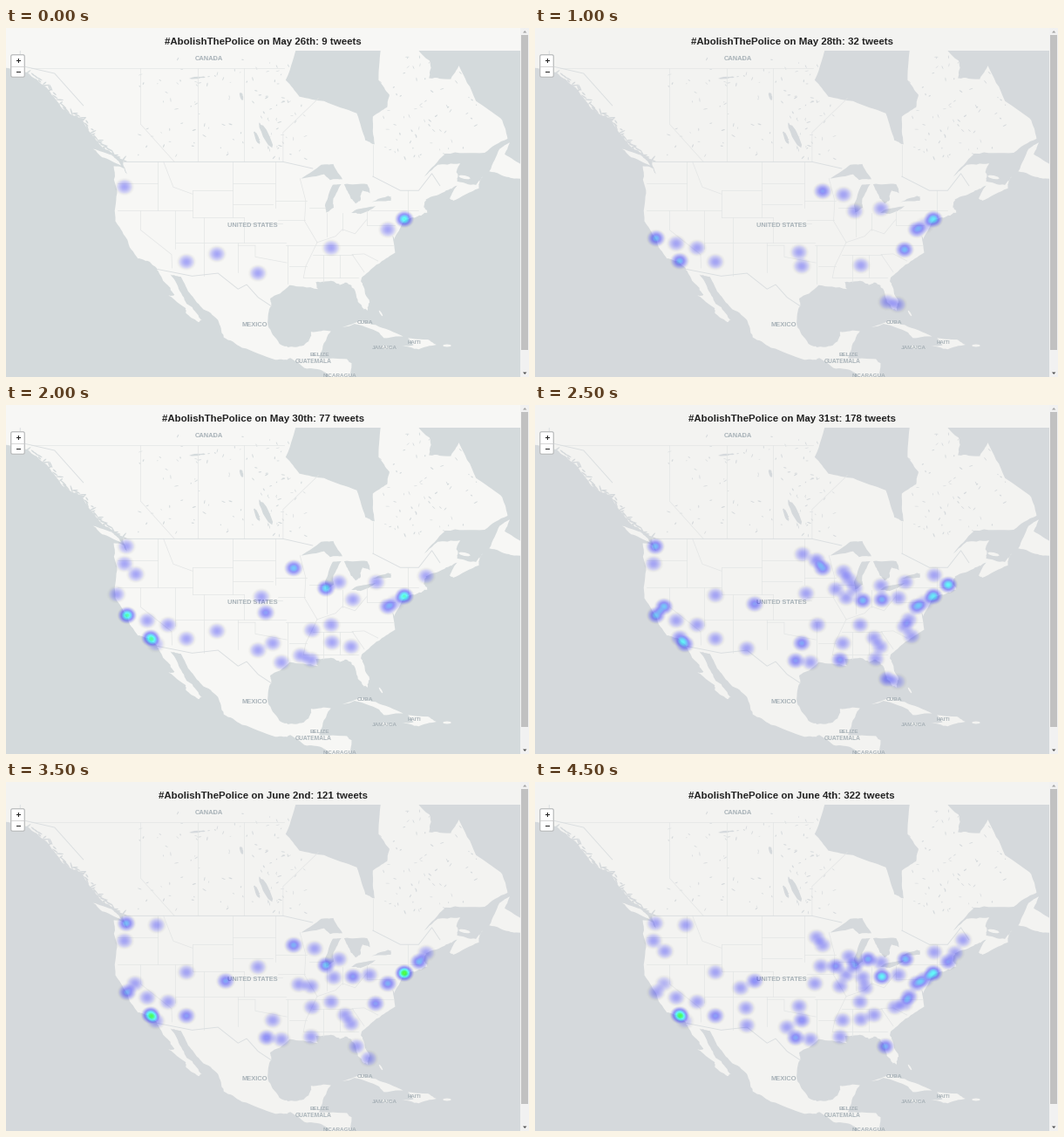
These frames come from a looping animation (600x400 px, 5 s). A matplotlib script:

```python
import numpy as np
import matplotlib.pyplot as plt
from matplotlib.animation import FuncAnimation
from matplotlib.patches import Polygon, Rectangle, FancyBboxPatch

W, H, TOP, RIGHT, DPI = 600, 400, 26, 590, 100
PX = 72 / DPI
rng = np.random.default_rng(7)

# Key points of the coast (longitude, latitude); rough() adds the detail
PACIFIC = [
    (-145, 60.3), (-139.8, 59.6), (-136.4, 58), (-133.6, 55.6),
    (-130.3, 54.4), (-128.3, 52.2), (-126.5, 50.8), (-123.1, 49.2),
    (-122.4, 47.3), (-122.8, 48.1), (-124.7, 48.4), (-124.1, 44.6),
    (-124.4, 40.4), (-122.5, 37.7), (-120.6, 34.5), (-118.4, 33.75),
    (-117.2, 32.7), (-115.8, 30.2), (-114.1, 28), (-115.1, 27.8),
    (-112.1, 25.5), (-112.1, 24.6), (-109.9, 22.9), (-109.4, 23.3),
    (-111.3, 25.9), (-113.2, 28.7), (-114.8, 31.6), (-113, 31.2),
    (-111.2, 27.95), (-109.4, 25.7), (-106.5, 23.3), (-105.5, 20),
    (-102.3, 18), (-96.5, 15.65), (-93.9, 16), (-91, 13.9), (-87.7, 13.1),
    (-86, 11.5)]
GULF = [
    (-83.5, 11), (-83.2, 15), (-84, 15.8), (-88.9, 16), (-88.2, 18.4),
    (-86.8, 21.2), (-90.3, 21.1), (-90.5, 19.8), (-91.5, 18.5),
    (-94.3, 18.1), (-95.8, 18.8), (-97.8, 22.4), (-97.2, 25.9),
    (-97.4, 27.3), (-94, 29.7), (-89.1, 29), (-89.5, 30.2), (-86.5, 30.4),
    (-85.3, 29.7), (-84, 30.1), (-82.8, 29.1), (-82.1, 26.7), (-81, 25.2)]
ATLANTIC = [
    (-80.4, 25.2), (-80.05, 26.5), (-81.3, 29.8), (-81.3, 31.2),
    (-77.9, 33.9), (-75.6, 35.3), (-76.3, 39), (-75.9, 37.2), (-74, 40.4),
    (-72, 41), (-70, 41.7), (-70.6, 42.5), (-70.2, 43.7), (-67, 44.8),
    (-64.8, 45.7), (-66.1, 43.8), (-65.5, 43.5), (-61, 45.3), (-60.4, 47),
    (-61.5, 45.8), (-64.8, 46.3), (-64.9, 47.7), (-64.3, 48.8),
    (-68.2, 48.6), (-70.5, 47), (-66.8, 50.1), (-60, 50.2), (-56, 52),
    (-57.2, 54.5), (-61.5, 56.5), (-64.5, 60.3), (-65.9, 58.9),
    (-69.7, 59), (-69.6, 60.8), (-74, 63)]
ISLANDS = [
    [(-128.3, 50.7), (-125, 49.9), (-123.4, 48.5), (-126.7, 49.6)],
    [(-59.2, 47.7), (-57.4, 50.7), (-55.6, 51.5), (-56.5, 50),
     (-53.2, 48.5), (-53, 46.7), (-55.8, 46.9)],
    [(-84.9, 21.9), (-82, 23.1), (-79, 22.4), (-74.2, 20.2), (-77.6, 19.9),
     (-78.5, 21), (-82.7, 22.6)],
    [(-74.4, 18.4), (-72.4, 18.5), (-73.4, 19.9), (-69.9, 19.6),
     (-68.4, 18.6), (-71.5, 17.7)]]
LAKES = [
    [(-78, 62.6), (-78.5, 58.8), (-76.6, 57.2), (-77, 55.8), (-79.5, 54.7),
     (-79.2, 51.3), (-80.8, 51.8), (-82.3, 55.1), (-88, 56.5), (-92.3, 57),
     (-94.7, 58.8), (-92.5, 62.6)],
    [(-92, 46.7), (-88.5, 48.6), (-86.4, 48.7), (-84.8, 46.6), (-87, 46.5),
     (-88, 47.3)],
    [(-87.6, 41.7), (-87.8, 43), (-86.5, 45.8), (-85, 45.9), (-86.4, 43.8),
     (-86.3, 42.5)],
    [(-84.5, 45.9), (-83.4, 44), (-82.5, 43.1), (-81.7, 43.5), (-81.3, 45),
     (-80, 44.6), (-80.5, 45.9)],
    [(-83.3, 41.7), (-81.7, 41.5), (-79, 42.7), (-82.3, 42.2)],
    [(-79.7, 43.3), (-77.5, 44), (-76.3, 44.1), (-76.4, 43.5)]]

# Borders: straight ones as (fixed, from, to), the others as key points
PARALLELS = [
    (60, -139, -95), (46, -124, -117), (46, -104, -96.5), (45, -111, -104),
    (43, -104, -97), (42, -124, -111), (41, -111, -102), (40, -102, -95.3),
    (37, -114, -94.6), (36.5, -94.6, -76), (35, -90, -83), (33, -94, -91),
    (31, -91.6, -82), (43.5, -96.5, -91), (40.6, -96, -91.4),
    (42.5, -90.6, -87.8), (42, -80, -71.5), (39.7, -80.5, -75.7)]
MERIDIANS = [
    (-110, 49, 60), (-102, 49, 60), (-117, 42, 49), (-111, 41, 45),
    (-104, 41, 49), (-114, 36, 42), (-109, 31.3, 41), (-102, 37, 41),
    (-103, 32, 37), (-94.3, 30, 36.5), (-88.2, 30.3, 35), (-85.2, 31, 35),
    (-84.8, 39, 41.7), (-87.5, 38, 41.7), (-80.5, 39.7, 42),
    (-79.5, 47, 51.2), (-73.4, 41, 45), (-96.5, 42.5, 49)]
WINDING = [
    [(-120, 60), (-120, 53.8), (-114.1, 49)],
    [(-89, 56.8), (-95.15, 52.8), (-95.15, 49)],
    [(-120, 42), (-120, 39), (-114.6, 35), (-114.5, 32.7)],
    [(-116, 49), (-114.3, 45.5), (-111, 44.5)],
    [(-92.2, 46.7), (-91.2, 43.5), (-91.4, 40.4), (-89.2, 37), (-91.2, 33),
     (-91.6, 31)],
    [(-89.2, 37), (-86, 38), (-84.8, 39.1), (-82.6, 38.4), (-80.6, 40.6)],
    [(-103, 36.5), (-100, 36.5), (-100, 34.6), (-94.5, 33.6)],
    [(-83.1, 35), (-81, 35.1), (-78.6, 33.9)], [(-83.1, 35), (-81, 32)]]
NATIONAL = [
    [(-123, 49), (-95.15, 49), (-90, 48.1)],
    [(-117.1, 32.5), (-111, 31.3), (-106.5, 31.8), (-103, 29),
     (-101.5, 29.8), (-99.5, 27.5), (-97.2, 25.9)],
    [(-79.5, 47), (-74.7, 45), (-71.5, 45), (-69.2, 47.4), (-67.8, 45.7)],
    [(-141, 62), (-141, 60.3), (-135, 59.5), (-130, 56)]]

LABELS = [
    ("CANADA", 233, 34.5, 7.5), ("UNITED STATES", 283, 226, 7.4),
    ("MEXICO", 285.5, 340, 7.5), ("CUBA", 412, 337, 6.5),
    ("JAMAICA", 434.5, 366, 6.4), ("HAITI", 468, 360, 6.2),
    ("BELIZE", 359.5, 373.5, 6.4), ("GUATEMALA", 352.5, 381, 6.6),
    ("NICARAGUA", 382.5, 398.5, 6.4)]

# Places on the stage, in pixels
PLACES = dict(
    sea=(138, 162), por=(136, 182), ore=(149, 194), eur=(127, 217),
    spo=(173, 164), boi=(186, 197), slc=(207, 218), sac=(148, 231),
    sf=(139, 241), cal=(162, 247), lv=(186, 252), la=(166, 267),
    sd=(172, 274), az=(207, 268), abq=(242, 259), elp=(243, 279),
    cos=(236, 236), den=(252, 228), ros=(270, 269), far=(307, 171),
    stc=(323, 178), msp=(330, 187), wis=(354, 191), gre=(360, 200),
    chi=(367, 210), mic=(382, 203), det=(397, 207), ind=(376, 224),
    ohi=(398, 223), lou=(379, 236), stl=(357, 221), iow=(345, 211),
    dav=(328, 211), oma=(311, 216), neb=(289, 212), kan=(293, 220),
    wic=(298, 238), kc=(321, 231), jef=(336, 232), col=(350, 234),
    tul=(324, 252), okc=(303, 257), dal=(306, 273), tex=(289, 281),
    aus=(299, 293), hou=(316, 295), br=(338, 287), no=(350, 292),
    lr=(351, 258), mem=(353, 273), nas=(373, 252), bir=(374, 272),
    atl=(396, 277), knx=(389, 267), sav=(391, 291), tam=(402, 303),
    fm=(404, 314), mia=(416, 317), wil=(432, 265), cha=(413, 258),
    ral=(424, 254), nor=(429, 246), dc=(438, 231), pit=(417, 221),
    phi=(447, 226), ny=(457, 219), buf=(425, 203), alb=(458, 195),
    bos=(474, 206), me=(482, 196), ban=(491, 181))

# (title, bright tiles, places with weights)
DAYS = [
    ("May 26th: 9", True, "por az abq tex nas dc ny*2.3"),
    ("May 27th: 14", False,
     "por sf la*1.5 lv den msp chi dal atl mia dc ny*2 bos"),
    ("May 28th: 32", False,
     "sf*1.7 cal lv la*1.7 az okc dal msp*1.4 wis chi det bir fm mia "
     "ral*1.7 dc*1.5 phi*.7 ny*2.1"),
    ("May 29th: 45", False,
     "sea por ore sf*2 cal lv la*2 sd az abq msp*2 wis chi*1.5 ohi okc "
     "dal aus hou no nas atl mia ral dc*1.5 phi ny*2 bos"),
    ("May 30th: 77", True,
     "sea por ore eur sf*2.5 cal lv la*2.4 sd*.8 az abq kan wic*1.4 tex "
     "dal hou br no msp*1.8 chi*2 mic ohi buf nas lr bir atl dc*1.5 "
     "phi*.7 ny*2.4 me"),
    ("May 31st: 178", False,
     "sea*1.7 por sac*1.8 sf*1.8 cal lv la*1.3 sd*1.7 slc den*1.4 az elp "
     "far stc*1.2 msp*1.6 wis iow gre chi stl ind*1.7 oma tul dal*1.5 "
     "aus*1.4 hou no*1.4 mem det ohi*1.6 pit buf alb bos*2.2 ny*2.1 "
     "phi*.8 dc*1.7 nor ral wil nas knx atl sav fm*1.3 mia*.8"),
    ("June 1st: 133", True,
     "sea*1.9 por ore boi*1.3 eur sac sf*1.8 cal*1.3 la*3 az den neb stc "
     "msp wis dav iow gre*.7 chi*1.7 mic stl kc jef col lou*1.8 ohi nas "
     "lr okc dal tex aus*1.4 br knx atl tam*1.5 mia ral*1.6 dc*1.5 nor*.7 "
     "ny*3 bos*2.5"),
    ("June 2nd: 121", False,
     "sea*1.7 por spo sf*1.6 sac cal lv la*2.6 sd az*1.4 slc den*1.5 neb "
     "msp*1.6 wis chi*1.8 mic ind jef col ohi*1.4 pit nas lr dal aus*1.3 "
     "hou no atl knx tam mia ral*1.4 dc*1.6 ny*3 bos*1.7 me"),
    ("June 3rd: 113", False,
     "sea*1.5 por*1.5 spo sf*1.3 sac cal lv la*2.3 sd*.8 az*2 ros cos "
     "den*1.9 neb oma msp*1.5 wis gre*.7 chi*1.9 ind jef col mic ohi pit "
     "ny*3.7 dc*1.5 nor bos*1.5 me cha ral knx mem dal aus*1.5 tam"),
    ("June 4th: 322", False,
     "sea por ore spo sf sac*.8 cal lv la*2.7 sd*.7 slc az*1.4 abq elp "
     "cos den*1.3 stc msp dav iow*1.4 gre chi*1.5 mic*1.6 det stl ind "
     "col kc lou ohi*2.2 pit buf*1.7 alb me ban bos*1.4 ny*2.2 phi*1.3 "
     "dc*1.5 nor*1.4 ral cha nas bir knx mem okc dal*1.3 tex aus*1.5 "
     "hou no tam*1.6")]


def project(points):
    lon, lat = np.array(points, float).T
    merc = np.degrees(np.log(np.tan(np.pi / 4 + np.radians(lat) / 2)))
    return np.column_stack([457 + (lon + 74) * 6.578,
                            219 - (merc - 44.65) * 5.6])


def rough(pts, amp=0.9, steps=3):
    """Subdivide a closed outline, nudging every new point."""
    for _ in range(steps):
        mid = (pts + np.roll(pts, -1, axis=0)) / 2
        mid += rng.normal(0, amp, mid.shape)
        pts = np.stack([pts, mid], axis=1).reshape(-1, 2)
        amp /= 1.7
    return pts


def oval(x, y, a, b, tilt):
    t = np.linspace(0, 2 * np.pi, 9)[:-1]
    z = (a * np.cos(t) + 1j * b * np.sin(t)) * np.exp(1j * tilt)
    return np.column_stack([x + z.real, y + z.imag])


fig = plt.figure(figsize=(W / DPI, H / DPI), dpi=DPI)
ax = fig.add_axes([0, 0, 1, 1])
ax.axis("off")
land, water = [], []


def shape(group, pts, z):
    group.append(ax.add_patch(Polygon(pts, lw=0, zorder=z)))


def box(x, y, w, h, color, z):
    return ax.add_patch(Rectangle((x, y), w, h, fc=color, lw=0, zorder=z))


def stroke(xs, ys, color, width, z):
    ax.plot(xs, ys, color=color, lw=width * PX, zorder=z)


def text(x, y, s, px, color, z, **kw):
    return ax.text(x, y, s, fontsize=px * PX, color=color, zorder=z,
                   family="Liberation Sans", weight="bold", ha="center", **kw)


water.append(box(0, 0, W, H, "w", 0))
shape(land, rough(project(PACIFIC + GULF + ATLANTIC + [(-145, 63)])), 1)
for isle in ISLANDS:
    shape(land, rough(project(isle), 0.5), 1)
for small in [(74, 90, 8, 3, 1.2), (435, 366, 6, 1.8, 0.1),
              (506, 364, 5, 1.5, 0), (430, 327, 4, 1, 1), (526, 171, 7, 2, 0.2)]:
    shape(land, oval(*small), 1)
for lake in LAKES:
    shape(water, rough(project(lake), 0.5), 2)
for small in [(298, 123, 16, 3.5, 1.1), (288, 126, 8, 2, 1.2),
              (220, 57, 10, 1.2, -0.1), (270, 78, 5, 1.6, 1.3)]:
    shape(water, rough(oval(*small), 0.5, 1), 2)

# Scattered northern lakes
for x0, x1, count in [(150, 325, 85), (300, 345, 35), (425, 540, 75)]:
    for x, y in rng.uniform((x0, 32), (x1, 150), (count, 2)):
        shape(water, oval(x, y, rng.uniform(0.8, 2.6), rng.uniform(0.3, 0.7),
                          rng.uniform(0, np.pi)), 2)
# Inlets along the north-west coast
for (x0, y0), (x1, y1) in zip(*[project(PACIFIC[i:i + 6]) for i in (1, 2)]):
    for t in np.linspace(0, 1, 8):
        x, y = x0 + t * (x1 - x0), y0 + t * (y1 - y0)
        shape(water, oval(x + rng.uniform(0, 5), y, rng.uniform(2, 5), 0.8,
                          rng.uniform(-0.9, 1.3)), 2)

lines = [[(a, lat), (b, lat)] for lat, a, b in PARALLELS]
lines += [[(lon, a), (lon, b)] for lon, a, b in MERIDIANS]
for line in lines + WINDING:
    stroke(*project(line).T, "#e3e5e5", 0.7, 3)
for line in NATIONAL:
    stroke(*project(line).T, "#dadee0", 0.9, 3)

for name, x, y, px in LABELS:
    text(x, y, name, px, "#a8b2b8", 4, va="center_baseline")

heat = ax.imshow(np.zeros((H - TOP, RIGHT, 4)), extent=(0, RIGHT, H, TOP),
                 interpolation="nearest", aspect="auto", zorder=5)

land.append(box(0, 0, RIGHT, TOP, "w", 6))
title = text(294.7, 19, "", 11.5, "#222222", 7, va="baseline")

# Zoom buttons
ax.add_patch(FancyBboxPatch((6.5, 31.5), 14, 24, fc="white", ec="#bdbfc0",
                            lw=1.3 * PX, zorder=7,
                            boxstyle="round,pad=0.8,rounding_size=2"))
stroke([6, 21], [43.5, 43.5], "#cccccc", 0.8, 8)
stroke([13.5, 13.5], [35.2, 39.2], "#222222", 1, 8)
for y in (37.2, 50):
    stroke([11.5, 15.5], [y, y], "#222222", 1, 8)

# Scrollbar
box(RIGHT, 0, W - RIGHT, H, "#f1f1f1", 7)
box(RIGHT + 1, 8, 8, 361, "#c1c1c1", 8)
for y, d, color in [(5.5, -2.5, "#a3a3a3"), (394.5, 2.5, "#505050")]:
    ax.add_patch(Polygon([(593, y), (597.4, y), (595.2, y + d)], fc=color,
                         lw=0, zorder=8))

ax.set_xlim(0, W)
ax.set_ylim(H, 0)

gy, gx = np.mgrid[TOP:H, 0:RIGHT] + 0.5
# Grey rim, then blue, cyan, lime, yellow and red
STOPS = [0.05, 0.13, 0.4, 0.6, 0.7, 0.8, 1]
RED = [100, 40, 0, 0, 0, 255, 255]
GREEN = [100, 40, 0, 255, 255, 255, 0]
BLUE = [110, 235, 255, 255, 0, 0, 0]


def heat_layer(spec):
    clear = np.ones(gx.shape)
    for item in spec.split():
        key, _, weight = item.partition("*")
        x, y = PLACES[key]
        r2 = ((gx - x) / 12) ** 2 + ((gy - y) / 10.8) ** 2
        spot = 0.34 * np.clip(1 - r2, 0, 1) ** 1.6
        clear *= (1 - spot) ** float(weight or 1)
    level = 1 - clear
    rgb = [np.interp(level, STOPS, c) / 255 for c in (RED, GREEN, BLUE)]
    return np.dstack(rgb + [level])


def draw(i):
    tail, bright, spec = DAYS[i]
    for p in land:
        p.set_facecolor("#f7f7f5" if bright else "#f3f3f1")
    for p in water:
        p.set_facecolor("#d4dadc" if bright else "#d5d9dc")
    title.set_text(f"#AbolishThePolice on {tail} tweets")
    heat.set_data(heat_layer(spec))
    return [title, heat]


anim = FuncAnimation(fig, draw, frames=len(DAYS), interval=500,
                     init_func=lambda: draw(0), repeat=True, blit=False)
plt.show()
```
